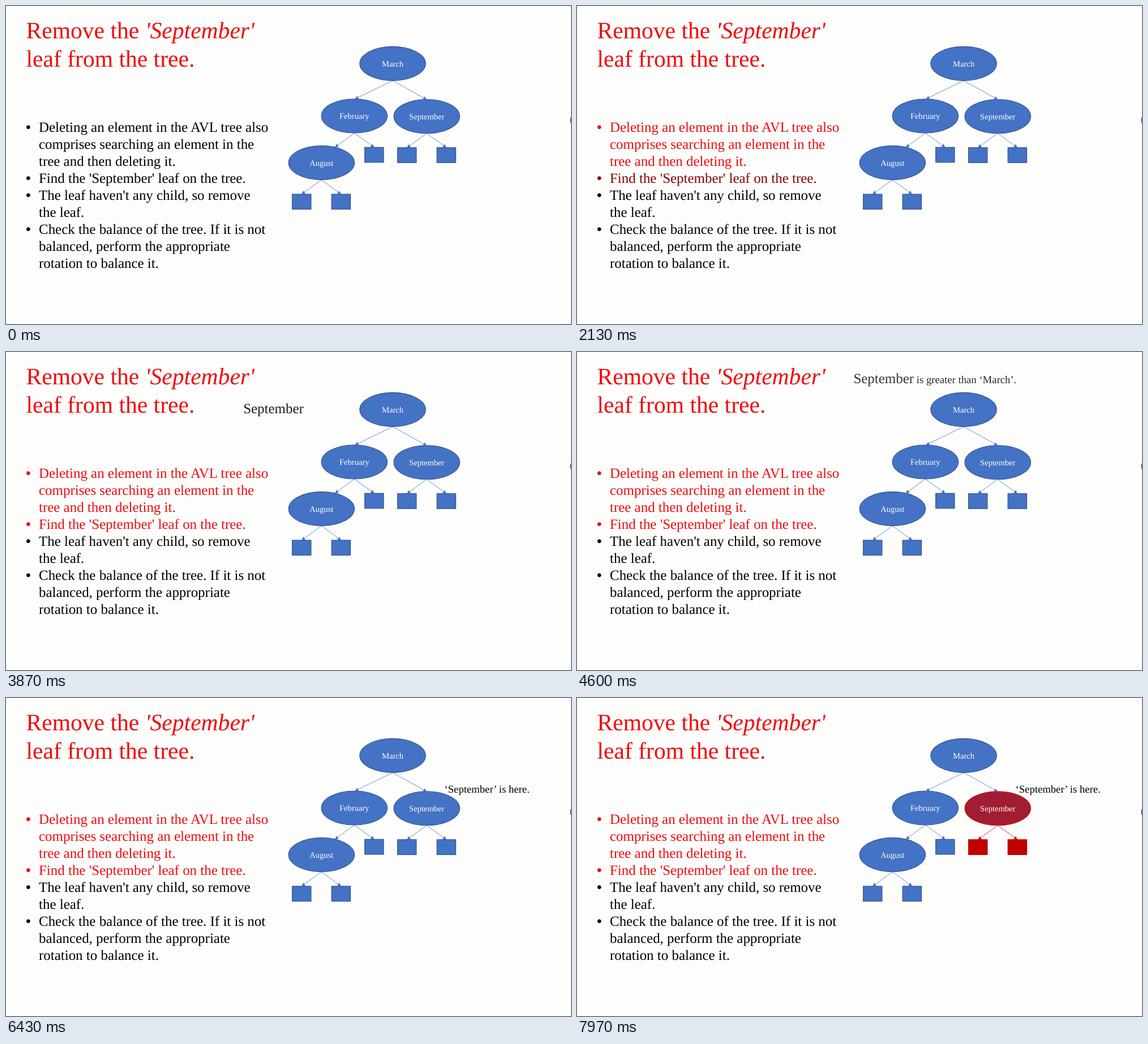
These frames come from a looping animation (998x561 px, 8 s). An HTML page:

```html
<!DOCTYPE html>
<html lang="en">
<head>
<meta charset="utf-8">
<title>Removing a leaf from an AVL tree</title>
<style>
  html, body { margin: 0; width: 100%; height: 100%; overflow: hidden; background: #fdfdfc; }
  svg { display: block; width: 998px; height: 561px; }
  text { font-family: "Liberation Serif", "Times New Roman", serif; text-rendering: geometricPrecision; white-space: pre; }
  .title { font-size: 41.58px; fill: #f00a0c; }
  .body { font-size: 24.95px; }
  .bullet { font-family: "Liberation Sans", Arial, sans-serif; }
  .note { font-size: 18.71px; }
  .label { font-size: 14.55px; fill: #fff; text-anchor: middle; }
  #bar { fill: none; stroke: #d6d6d6; stroke-width: 1; }
</style>
</head>
<body>
<svg id="stage" viewBox="0 0 998 561">
  <text class="title" x="35.5" y="57">Remove the <tspan font-style="italic">'September'</tspan></text>
  <text class="title" x="35.5" y="107">leaf from the tree.</text>
  <g id="list"></g>
  <g id="tree"></g>
  <g id="compare">
    <text id="mover" class="body" fill="#1c1c22">September</text>
    <text id="greater" class="note" x="599.8" y="55.2" fill="#0c0c10">is greater than ‘March’.</text>
  </g>
  <text id="right" class="note" x="738.5" y="75">Move to the right.</text>
  <text id="here" class="note" x="774.5" y="167">‘September’ is here.</text>
  <path d="M998 196 L996.8 198 V205 L998 207 Z" fill="#333"/>
  <g id="bar">
    <path d="M12 551 H7 M9 548.5 L6.5 551 L9 553.5"/>
    <path d="M27 551 H32 M30 548.5 L32.5 551 L30 553.5"/>
    <path d="M46 554.5 L52.5 547.5" stroke-width="2"/>
    <path d="M65.5 547.5 h5 v5 h-5 Z M67.5 549.5 h5 v5 h-5 Z" stroke="#c6c6c6"/>
    <path d="M90 552 L92.5 555 M85 549.8 a2.8 2.8 0 1 0 5.6 0 a2.8 2.8 0 1 0 -5.6 0" stroke="#c6c6c6"/>
    <path d="M104.5 551 h8" stroke-width="1.8" stroke-dasharray="1.8 1.2"/>
  </g>
</svg>
<script>
const LOOP = 8000;
const BLUE = [68, 114, 196], EDGE = [47, 82, 143];
const BLACK = [0, 0, 0], RED = [240, 10, 14], DARK_RED = [192, 0, 0], RIM = [214, 10, 12];
const $ = id => document.getElementById(id);

function add(parent, tag, attrs, text) {
  const el = document.createElementNS("http://www.w3.org/2000/svg", tag);
  for (const key in attrs) el.setAttribute(key, attrs[key]);
  if (text) el.textContent = text;
  return parent.appendChild(el);
}

const clamp = v => Math.max(0, Math.min(1, v));
const ramp = (t, from, to) => clamp((t - from) / (to - from));
const rgb = c => `rgb(${c.map(Math.round).join()})`;
const mix = (a, b, p) => rgb(a.map((v, i) => v + (b[i] - v) * p));
const ease = u => u < 0.5 ? 2 * u * u : 1 - 2 * (1 - u) ** 2;

// Bulleted list
const items = [
  ["Deleting an element in the AVL tree also", "comprises searching an element in the", "tree and then deleting it."],
  ["Find the 'September' leaf on the tree."],
  ["The leaf haven't any child, so remove", "the leaf."],
  ["Check the balance of the tree. If it is not", "balanced, perform the appropriate", "rotation to balance it."]
];
let row = 0;
const points = items.map(lines => {
  const g = add($("list"), "g", {});
  lines.forEach((line, i) => {
    const y = 222.2 + 29.94 * row++;
    if (!i) add(g, "text", { class: "body bullet", x: 35, y }, "•");
    add(g, "text", { class: "body", x: 58, y }, line);
  });
  return g;
});

// Tree: each node is an ellipse with two arrows and any empty leaves
function arrow(g, x1, y1, x2, y2) {
  const d = Math.hypot(x2 - x1, y2 - y1), ux = (x2 - x1) / d, uy = (y2 - y1) / d;
  const bx = x2 - ux * 6, by = y2 - uy * 6, w = 3.3;
  add(g, "path", { d: `M${x1} ${y1}L${bx} ${by}`, stroke: "currentColor", "stroke-width": 0.8 });
  add(g, "path", { d: `M${x2} ${y2}L${bx - uy * w} ${by + ux * w}L${bx + uy * w} ${by - ux * w}Z`, fill: "currentColor" });
}

function node(name, x, y, ends, leaves) {
  const g = add($("tree"), "g", {});
  const arrows = add(g, "g", { color: rgb(BLUE) });
  const style = { fill: rgb(BLUE), stroke: rgb(EDGE), "stroke-width": 1.1 };
  const boxes = leaves.map(([lx, ly]) => add(g, "rect", { x: lx - 16.7, y: ly, width: 33.4, height: 26.6, ...style }));
  const oval = add(g, "ellipse", { cx: x, cy: y, rx: 58.2, ry: 30, ...style });
  ends.forEach(([ex, ey]) => arrow(arrows, x, y + 30, ex, ey));
  add(g, "text", { class: "label", x, y: y + 5.2 }, name);
  return { arrows, boxes, oval };
}

const pair = (x, y) => [[x - 34.8, y], [x + 34.8, y]];
const augustLeaves = pair(557, 332), septemberLeaves = pair(743, 249.8);
node("August", 557.3, 276.6, augustLeaves, augustLeaves);
node("February", 615.3, 194, [[581, 249.3], [650.3, 249.3]], [[650.3, 249.3]]);
const found = node("September", 743.2, 194.8, septemberLeaves, septemberLeaves);
node("March", 683, 101.6, [[616.5, 164], [743, 165]], []);

for (let i = 0; i < 6; i++) add($("bar"), "circle", { cx: 9.5 + 19.75 * i, cy: 551, r: 7.4 });

const show = (id, p) => $(id).setAttribute("opacity", p);

function draw(t) {
  show("bar", t >= 200 && t < 1800 ? 1 : 0);
  points[0].setAttribute("fill", mix(BLACK, RED, ramp(t, 870, 1140)));
  points[1].setAttribute("fill", mix(BLACK, RED, ramp(t, 1980, 2260)));

  // The word travels from the list to the root
  const p = ease(ramp(t, 3205, 4185));
  $("mover").setAttribute("x", 151.2 + 337.2 * p);
  $("mover").setAttribute("y", 312 - 256.8 * p);
  show("mover", t >= 3170 ? 1 : 0);
  show("greater", ramp(t, 3950, 4230));
  show("compare", 1 - ramp(t, 4570, 4830));
  show("right", ramp(t, 5310, 5590) * (1 - ramp(t, 6170, 6430)));
  show("here", ramp(t, 6170, 6430));

  const quick = ramp(t, 7200, 7475), slow = ramp(t, 7200, 8230);
  found.boxes.forEach(b => {
    b.setAttribute("fill", mix(BLUE, DARK_RED, quick));
    b.setAttribute("stroke", mix(EDGE, DARK_RED, quick));
  });
  found.arrows.setAttribute("color", mix(BLUE, RIM, quick));
  found.oval.setAttribute("stroke", mix(EDGE, RIM, quick));
  found.oval.setAttribute("fill", mix(BLUE, DARK_RED, slow));
}

const start = performance.now();
function tick() {
  draw((performance.now() - start) % LOOP);
  requestAnimationFrame(tick);
}
draw(0);
requestAnimationFrame(tick);
</script>
</body>
</html>
```
